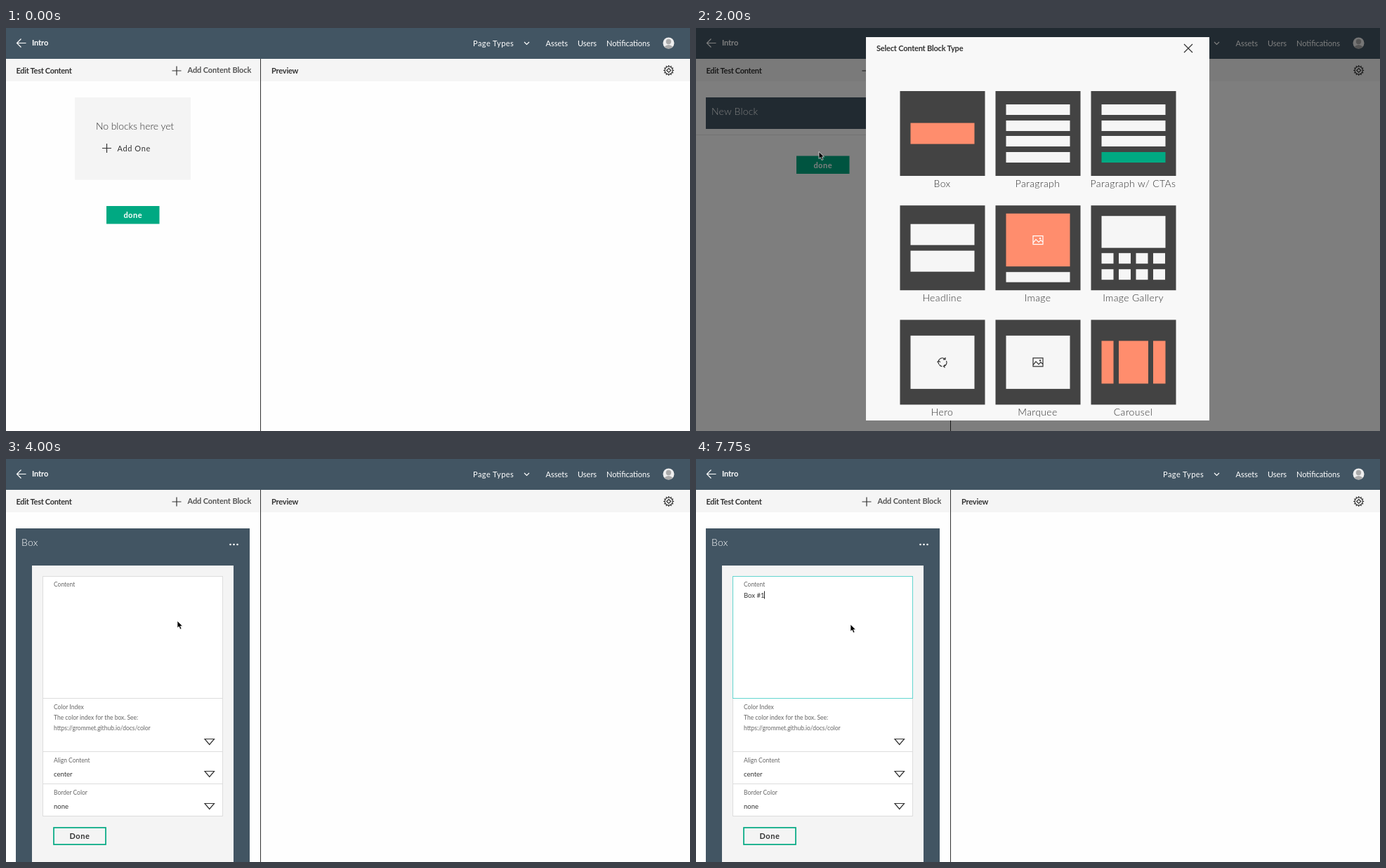
Write an HTML page that moves like this. It is 974 by 575 pixels and loops after 8 s.

```html
<!DOCTYPE html>
<html>
<head>
<meta charset="utf-8">
<style>
html, body { margin: 0; width: 100%; height: 100%; overflow: hidden; background: #fefefe; }
svg { display: block; }
text { font-family: Lato, "Open Sans", sans-serif; font-size: 11px; fill: #333; white-space: pre; }
.b { font-weight: 700; }
.l { font-weight: 300; font-size: 14px; }
.s { font-size: 8.5px; fill: #666; }
.v { font-size: 9.5px; }
.w { fill: #fff; }
.m { text-anchor: middle; }
.line { fill: none; stroke: #333; stroke-width: 1.2; }
</style>
</head>
<body>
<svg id="stage" width="974" height="575" viewBox="0 0 974 575"></svg>
<script>
const rect = (x, y, w, h, fill, more = '') =>
  `<rect x="${x}" y="${y}" width="${w}" height="${h}" fill="${fill}" ${more}/>`;
const text = (x, y, str, cls = '', gap = 0, more = '') =>
  `<text x="${x}" y="${y}" class="${cls}" letter-spacing="${gap}" ${more}>${str}</text>`;
const line = (d, more = '') => `<path class="line" d="${d}" ${more}/>`;
const group = (id, body) => `<g id="${id}">${body}</g>`;
const plus = (x, y, more) => line(`M${x - 6.5} ${y}h13M${x} ${y - 6.5}v13`, more);
const SLATE = '#425563', GREEN = '#00a982', CORAL = '#ff8d6d', PALE = '#f6f6f6';

function header() {
  const teeth = Array.from({ length: 12 }, (_, i) =>
    `<path class="line" d="M0-5.6v-1.9" stroke-width="1.6" transform="translate(943.7 60.5) rotate(${i * 30})"/>`).join('');
  return rect(0, 0, 974, 44, SLATE) + rect(0, 44, 974, 32, '#f5f5f5') + rect(362, 44, 1, 531, '#333') +
    line('M28.500 21.500H15.500M21.500 15.500l-6 6 6 6', 'style="stroke:#fff"') +
    text(37, 25, 'Intro', 'b w', -.1) +
    text(665, 25.500, 'Page Types', 'w', .45) +
    line('M738 20l3.500 3.500 3.500-3.500', 'style="stroke:#fff"') +
    text(768.500, 25.500, 'Assets', 'w') + text(814, 25.500, 'Users', 'w') +
    text(855, 25.500, 'Notifications', 'w') +
    '<circle cx="943.500" cy="21.500" r="8" fill="#eee"/><circle cx="943.500" cy="19.500" r="3.700" fill="#aaa"/>' +
    '<path d="M937.500 26.800q6-5.600 12 0a8 8 0 0 1-12 0" fill="#aaa"/>' +
    text(14.500, 64.500, 'Edit Test Content', 'b', -.3) +
    plus(243, 61) + text(258.500, 64, 'Add Content Block', 'b', -.1, 'style="fill:#555"') +
    text(378, 64.500, 'Preview', 'b', -.2) +
    teeth + '<circle class="line" cx="943.700" cy="60.500" r="5.600"/>' +
    line('M943.700 57.500l3 3-3 3-3-3z');
}

const done = y => rect(143, y, 75.500, 25.500, GREEN) + text(180.700, y + 17, 'done', 'b w m', .5);

const empty = () => rect(98, 99, 165, 117.500, '#f4f4f4') +
  text(128, 144.500, 'No blocks here yet', 'l', -.1) +
  `<g id="add">${plus(143.500, 171.500)}</g>` + text(158.500, 175.500, 'Add One', '', .6) + done(254);

const picture = (x, y, color) =>
  line(`M${x - 7} ${y - 6}h14v12h-14zM${x - 7} ${y + 4}l4-5 4 4 3-3 3 3`, `style="stroke:${color}"`) +
  `<circle cx="${x + 3}" cy="${y - 2.500}" r="1.200" fill="${color}"/>`;

// Each drawing is relative to its tile's top left corner.
const bars = last => [19, 42, 64, 87].map((y, i) => rect(15, y, 91, 15, i == 3 ? last : PALE)).join('');
const tiles = [
  ['Box', rect(15, 45.500, 91, 30, CORAL)],
  ['Paragraph', bars(PALE)],
  ['Paragraph w/ CTAs', bars(GREEN)],
  ['Headline', rect(15, 26.500, 91, 30, PALE) + rect(15, 64.500, 91, 30, PALE)],
  ['Image', rect(15, 11.500, 91, 75.500, CORAL) + rect(15, 95, 91, 14.500, PALE) + picture(60.500, 49.500, '#fff')],
  ['Image Gallery', rect(15, 15, 91, 45.500, PALE) + [68, 91].map(y =>
    [15, 39.500, 64, 88.500].map(x => rect(x, y, 17, 15, PALE)).join('')).join('')],
  ['Hero', rect(15, 22.500, 91, 76, PALE) +
    line('M55.500 63.500a5.500 5.500 0 0 1 1-7.500 5.500 5.500 0 0 1 7.500 0M66 58.500a5.500 5.500 0 0 1-3 7.500M60 66.500a5.500 5.500 0 0 1-4-2.500M61.500 56.500h3v-3M53 60.500l2-2 2.500 2M64 64l-2 2.300 2 2')],
  ['Marquee', rect(15, 22.500, 91, 76, PALE) + picture(60.500, 60.500, '#333')],
  ['Carousel', rect(15, 30, 17, 61, CORAL) + rect(39.500, 30, 42, 61, CORAL) + rect(88.500, 30, 17.500, 61, CORAL)]
];

const modal = () => rect(14, 99, 333, 45, SLATE) + text(22, 124, 'New Block', 'l w', .2) +
  rect(0, 152, 362, 1, '#e6e6e6') + done(182.500) +
  rect(0, 0, 974, 575, '#000', 'opacity=".5"') +
  rect(242, 13, 489, 547, '#f8f8f8') + text(257, 33, 'Select Content Block Type', 'b', -.2) +
  line('M695 23l12 12M707 23l-12 12') +
  tiles.map(([name, art], i) =>
    `<g transform="translate(${290.500 + i % 3 * 136} ${90 + Math.floor(i / 3) * 163.200})">` +
    rect(0, 0, 121, 121, '#434343') + art + text(60, 136.500, name, 'l m', .35) + '</g>').join('');

const field = (y, h) => rect(52.500, y, 256, h, '#fff', 'stroke="#ddd"');
const arrow = y => line(`M283 ${y}h13.500l-6.750 8z`);
const editor = () => rect(14, 99, 333, 476, SLATE) + text(22, 124, 'Box', 'l w', .2) +
  [319.500, 324.500, 329.500].map(x => `<circle cx="${x}" cy="122" r="1.300" fill="#fff"/>`).join('') +
  rect(37, 152, 287, 423, '#f4f4f4') +
  group('fields', field(167.500, 174) + field(341.500, 76) + field(417.500, 46) + field(463.500, 46) +
    arrow(399.500) + arrow(445.500) + arrow(491.500)) +
  rect(52.500, 167.500, 256, 174, '#fff', 'id="focus" stroke="#63d5cf"') +
  text(68, 182, 'Content', 's') + text(68, 356.500, 'Color Index', 's') +
  text(68, 372, 'The color index for the box. See:', 's') +
  text(68, 387, 'https://grommet.github.io/docs/color', 's') +
  text(68, 433, 'Align Content', 's') + text(68, 452.500, 'center', 'v') +
  text(68, 479, 'Border Color', 's') + text(68, 498.500, 'none', 'v') +
  text(68, 197.500, '', 'v', 0, 'id="typed"') + rect(0, 188.500, 1, 11, '#222', 'id="caret"') +
  group('button', rect(68, 526, 74, 24, 'none', `stroke="${GREEN}" stroke-width="1.700"`) +
    text(105, 542, 'Done', 'b m', .6));

const $ = id => document.getElementById(id);
$('stage').innerHTML = header() + group('empty', empty()) + group('modal', modal()) +
  group('editor', editor()) +
  '<path id="cursor" d="M0 0v10l2.300-2 1.700 4 2-.800-1.700-3.800h3.200z" fill="#000" stroke="#fff" stroke-width=".700"/>';

// time, x, y
const path = [
  [250, 288, 127], [500, 207, 226], [1000, 196, 210], [1250, 181, 186], [1500, 175, 176.500],
  [2250, 175, 176.500], [2500, 245, 168], [2750, 264, 175], [3000, 380, 163], [3250, 380, 163],
  [3500, 345, 184], [3750, 290, 212], [4000, 244, 231], [4250, 220, 236]
];
const show = (id, on) => $(id).setAttribute('visibility', on ? 'inherit' : 'hidden');

function draw(now) {
  const t = Math.floor(now % 8000 / 250) * 250;
  show('empty', t < 2000);
  show('modal', t >= 2000 && t < 3250);
  show('editor', t >= 3250);

  const [, x, y] = path.findLast(p => p[0] <= t) || path[0];
  show('cursor', t >= 250);
  $('cursor').setAttribute('transform', `translate(${x} ${y})`);
  $('add').style.filter = t >= 1500 ? 'brightness(0) drop-shadow(0 0 .3px #000)' : '';

  $('fields').setAttribute('opacity', t < 3500 ? .1 : 1);
  $('button').setAttribute('opacity', t < 3500 ? .78 : 1);
  show('focus', t >= 4500);
  const typed = $('typed');
  typed.textContent = 'Box #1'.slice(0, Math.max(0, Math.min(6, (t - 5500) / 125)));
  show('caret', t >= 4500 && !(t >= 4750 && t < 5250) && !(t >= 6750 && t < 7250));
  $('caret').setAttribute('x', 68 + Math.round(typed.getComputedTextLength()));
  requestAnimationFrame(() => draw(performance.now()));
}
draw(0);
</script>
</body>
</html>
```
